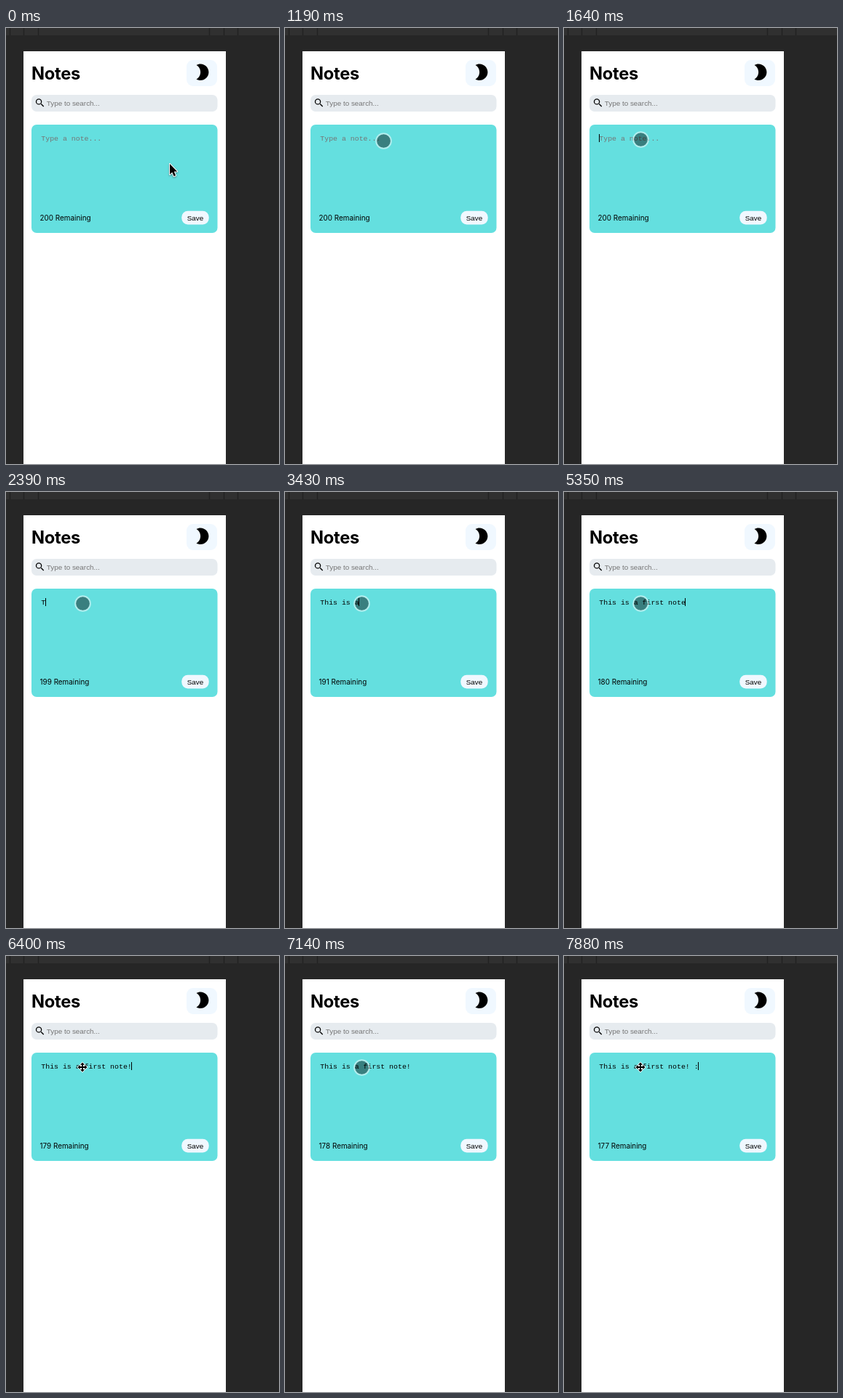
These frames come from a looping animation (375 px wide and 600 px high, 8 s). An HTML page:

```html
<!DOCTYPE html>
<html lang="en">
<head>
<meta charset="utf-8">
<title>Notes</title>
<style>
  html, body { margin: 0; width: 100%; height: 100%; overflow: hidden; background: #262626; }
  svg { display: block; }
  text { white-space: pre; }
  .title { font: 700 23.7px Inter, sans-serif; letter-spacing: -.3px; }
  .count { font: 9.88px Inter, sans-serif; }
  .field { font: 9.88px "Liberation Sans", Arial, sans-serif; }
  .note { font: 9.88px "Liberation Mono", "Courier New", monospace; }
  .outlined { stroke: #fff; paint-order: stroke; stroke-linejoin: round; }
</style>
</head>
<body>
<svg width="375" height="600" viewBox="0 0 375 600">
  <path fill="#303030" d="M0 0h375v10H0z"/>
  <path stroke="#222" stroke-width="1.5" d="M5.5 0v10M24.5 0v10M44.5 0v10M279.5 0v10M299.5 0v10M318.5 0v10"/>
  <path fill="#fff" d="M24 32h278v568H24z"/>

  <text class="title" x="35" y="71">Notes</text>
  <rect x="248" y="44" width="42" height="36" rx="9" fill="#f0f8ff"/>
  <path transform="translate(256.4 47.2) scale(1.13)" d="M9.5 2c-1.82 0-3.53.5-5 1.35 2.99 1.73 5 4.95 5 8.65s-2.01 6.92-5 8.65c1.47.85 3.18 1.35 5 1.35 5.52 0 10-4.48 10-10S15.02 2 9.5 2z"/>

  <rect x="35" y="92" width="255.5" height="23" rx="7" fill="#e6ebef"/>
  <g transform="translate(38.9 95.2) scale(.65)">
    <circle cx="9.5" cy="9.5" r="5.5" fill="none" stroke="#000" stroke-width="2"/>
    <path d="M15.5 14h-.79l-.98.43.27.28v.79l5 4.99L20.49 19z"/>
  </g>
  <text class="field" x="55.8" y="106.5" fill="#757575">Type to search...</text>

  <rect x="35" y="133" width="255.5" height="149" rx="7" fill="#64dfdf"/>
  <text class="note" id="note" x="48.3" y="155.3"></text>
  <rect id="caret" y="146" width="1" height="11"/>
  <text class="count" id="count" x="46.6" y="264.6"></text>
  <rect x="241.3" y="251.8" width="37.4" height="18.6" rx="8.5" fill="#f0f8ff"/>
  <text class="field" x="248.7" y="264.6">Save</text>

  <g id="arrow">
    <path class="outlined" stroke-width="2" style="filter:drop-shadow(0 1px 1px #0006)"
      d="M0 0V14.4L3.3 11.4 5.7 17 8.1 16 5.8 10.5H10.2Z"/>
  </g>
  <g id="touch">
    <circle r="9.6" fill="#000" fill-opacity=".43"/>
    <circle r="10.3" fill="none" stroke="#fff" stroke-opacity=".5" stroke-width="2"/>
  </g>
  <g id="move" transform="translate(105 153)">
    <path class="outlined" stroke-width="1.6"
      d="M0-6.5 3-3.2H1V-1H3.2V-3L6.5 0 3.2 3V1H1V3.2H3L0 6.5-3 3.2H-1V1H-3.2V3L-6.5 0-3.2-3V-1H-1V-3.2H-3Z"/>
  </g>
</svg>
<script>
const DURATION = 8000, LIMIT = 200;
const MESSAGE = "This is a first note! :", CHAR_WIDTH = 5.93;

// Times in ms
const keys = [2390, 2530, 2680, 2830, 2830, 2980, 3130, 3280, 3430, 3580,
  3870, 4020, 4170, 4170, 4320, 4460, 4760, 4900, 5200, 5350, 6400, 6700, 7590];
const caretFlips = [1640, 2090, 2390, 5800, 6400, 7140, 7590];
const pointerFlips = [1190, 2240, 2390, 6100, 6550, 7290, 7590, 7880];
const glideSteps = [300, 450, 590, 740];

const [note, caret, count, arrow, touch, move] =
  ["note", "caret", "count", "arrow", "touch", "move"].map(id => document.getElementById(id));

const passed = (times, t) => times.filter(time => time <= t).length;
const show = (el, on) => el.setAttribute("visibility", on ? "visible" : "hidden");
const place = (el, x, y) => el.setAttribute("transform", `translate(${x} ${y})`);

function draw(t) {
  const typed = passed(keys, t);
  note.textContent = typed ? MESSAGE.slice(0, typed) : "Type a note...";
  note.setAttribute("fill", typed ? "#000" : "#757575");
  count.textContent = `${LIMIT - typed} Remaining`;

  caret.setAttribute("x", Math.floor(48.1 + typed * CHAR_WIDTH));
  show(caret, passed(caretFlips, t) % 2);

  const flips = passed(pointerFlips, t);
  show(arrow, !flips);
  show(touch, flips % 2);
  show(move, flips && flips % 2 === 0);

  const p = passed(glideSteps, t) / glideSteps.length;
  const eased = p * p * (3 - 2 * p);
  place(arrow, 225 - 68 * eased, 187 - 34 * eased);
  if (t < 1340) place(touch, 135.5, 155.5);
  else place(touch, 105.5, 153.5);
}

function frame() {
  draw(performance.now() % DURATION);
  requestAnimationFrame(frame);
}
frame();
</script>
</body>
</html>
```
